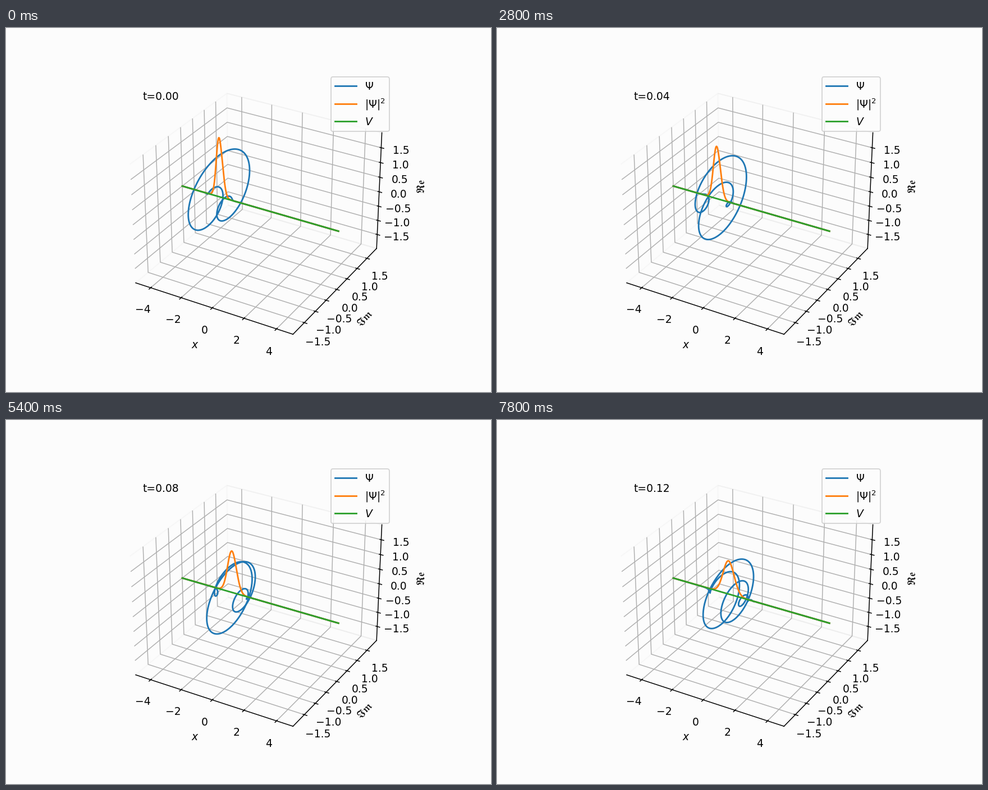
Write a matplotlib script that moves like this. It is 864 px wide and 648 px high and loops after 8000 ms.

```python
import numpy as np
import matplotlib.pyplot as plt
from matplotlib.animation import FuncAnimation

BG = "#fcfcfc"
FRAMES, INTERVAL = 40, 200
DT = 0.003                     # simulated time per frame
X0, K, SIGMA = -2.5, 10, 0.2   # start, wave number and width of the packet

plt.rcParams.update({"figure.facecolor": BG, "axes.facecolor": BG})

x = np.linspace(-5, 5, 2000)
zero = np.zeros_like(x)


def packet(t):
    """Free Gaussian wave packet with hbar = m = 1."""
    spread = 1 + 0.5j * t / SIGMA**2
    d = x - X0
    norm = (2 * np.pi * SIGMA**2) ** -0.25 / np.sqrt(spread)
    envelope = np.exp(-((d - K * t) ** 2) / (4 * SIGMA**2 * spread))
    return norm * envelope * np.exp(1j * K * (d - K * t / 2))


fig = plt.figure(figsize=(6.4, 4.8), dpi=135)
ax = fig.add_subplot(projection="3d")
for axis in (ax.xaxis, ax.yaxis, ax.zaxis):
    axis.pane.fill = False

psi_line, = ax.plot(x, zero, zero, label=r"$\Psi$")
rho_line, = ax.plot(x, zero, zero, label=r"$|\Psi|^2$")
ax.plot(x, zero, zero, label=r"$V$")
clock = ax.text2D(0.1, 0.9, "", transform=ax.transAxes)

ticks = np.arange(-1.5, 1.6, 0.5)
ax.set(xlim=(-5, 5), ylim=(-2, 2), zlim=(-2, 2),
       xticks=range(-4, 5, 2), yticks=ticks, zticks=ticks,
       xlabel=r"$x$", ylabel=r"$\mathfrak{Im}$", zlabel=r"$\mathfrak{Re}$")
ax.legend(loc="upper right")


def update(i):
    t = i * DT
    psi = packet(t)
    psi_line.set_data_3d(x, psi.imag, psi.real)
    rho_line.set_data_3d(x, zero, abs(psi) ** 2)
    clock.set_text(f"t={t:.2f}")
    return psi_line, rho_line, clock


anim = FuncAnimation(fig, update, frames=FRAMES, interval=INTERVAL,
                     repeat=True, repeat_delay=0)
plt.show()
```
